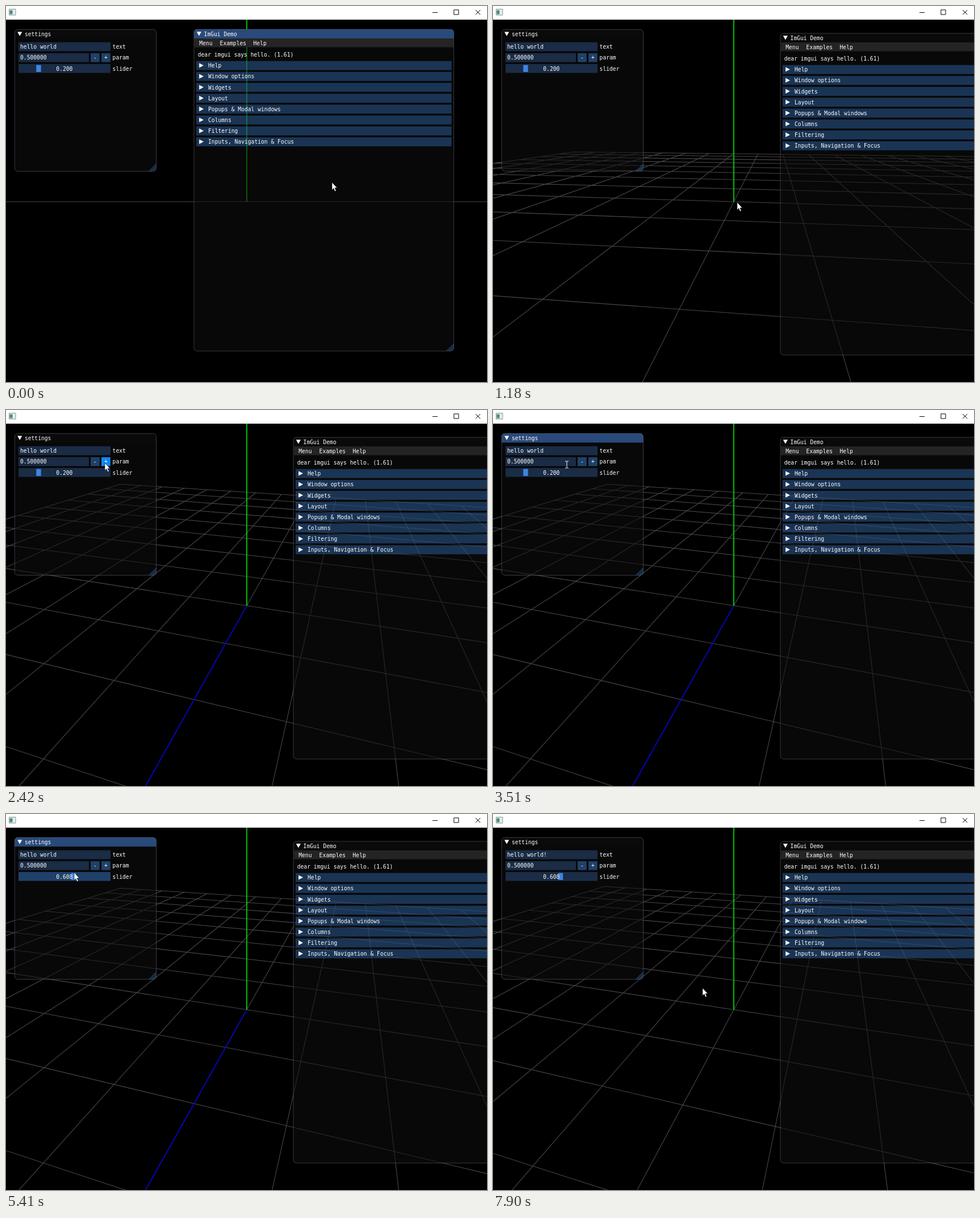
Write an HTML page that moves like this. It is 847 px wide and 661 px high and loops after 8000 ms.

```html
<!DOCTYPE html>
<html lang="en">
<head>
<meta charset="utf-8">
<title>Settings demo</title>
<style>
  html, body { margin: 0; width: 100%; height: 100%; overflow: hidden; background: #000; }
  svg { display: block; width: 847px; height: 661px; }
  text { font: 9.67px "DejaVu Sans Mono", monospace; fill: #fff; white-space: pre; }
</style>
</head>
<body>
<svg id="stage" viewBox="0 0 847 661"></svg>
<script>
const LOOP = 8000;
const CX = 424, CY = 344, FOCAL = 553, DIST = 5, HALF = 8, NEAR = 0.05;
const COL = {
  frame: 'rgba(41,74,122,.54)', hover: 'rgba(66,150,250,.4)', active: 'rgba(66,150,250,.67)',
  header: 'rgba(66,150,250,.31)', blue: '#4296fa', press: '#0f87fa',
  title: '#0a0a0a', titleOn: '#294a7a', grid: '#484848'
};

// The picture only changes on these beats: first, last, count.
const BEATS = [
  [280, 1310, 9], [1430, 1430, 1], [1700, 2660, 8], [2780, 3750, 8], [3910, 4590, 6],
  [4870, 5830, 8], [6380, 6530, 2], [7180, 7900, 6]
];

// Tracks: time followed by values, linear in between.
const CURSOR = [
  [0, 574, 310], [280, 545, 316], [409, 514, 320], [538, 556, 321], [667, 618, 323],
  [795, 674, 325], [924, 689, 327], [1053, 570, 318], [1181, 430, 345], [1310, 385, 409],
  [1430, 379, 410], [1600, 379, 410], [2380, 174, 93], [2780, 174, 93], [3057, 156, 92],
  [3334, 156, 92], [3473, 130, 96], [3750, 59, 103], [3910, 62, 107], [4590, 129, 110],
  [4870, 126, 110], [5144, 119, 109], [5281, 120, 103], [5420, 122, 92], [5830, 130.5, 68.5],
  [6380, 136, 71], [6530, 142.5, 74.5], [7180, 142.5, 74.5], [7324, 235, 165],
  [7468, 366, 290], [7900, 369, 306]
];
const DEMO = [
  [0, 331, 41], [409, 331, 41], [538, 373, 42], [667, 435, 44], [795, 491, 46], [924, 506, 48]
];
const CAMERA = [
  [1053, 0, 0], [1181, 7, 14], [1310, 14.29, 29.1], [1430, 16.4, 31.57],
  [7468, 16.4, 31.57], [7900, 15.88, 32.03]
];
const SLIDER = [[3750, .2], [3910, .23], [4590, .674], [4870, .654], [5144, .608]];

const HEADERS = ['Help', 'Window options', 'Widgets', 'Layout', 'Popups & Modal windows',
  'Columns', 'Filtering', 'Inputs, Navigation & Focus'];

function snap(t) {
  let last = 0;
  for (const [a, b, n] of BEATS) {
    if (t + 6 < a) break;
    const gap = n > 1 ? (b - a) / (n - 1) : 1;
    last = a + gap * Math.min(n - 1, Math.floor((t + 6 - a) / gap));
  }
  return last;
}

function at(track, t) {
  if (t <= track[0][0]) return track[0].slice(1);
  for (let i = 1; i < track.length; i++) {
    const a = track[i - 1], b = track[i];
    if (t <= b[0]) {
      const k = (t - a[0]) / (b[0] - a[0]);
      return a.slice(1).map((v, j) => v + (b[j + 1] - v) * k);
    }
  }
  return track[track.length - 1].slice(1);
}

const during = (t, a, b) => t >= a && t < b;
const inside = (x, y, l, top, r, b) => x >= l && x <= r && y >= top && y <= b;
const esc = s => s.replace(/&/g, '&amp;');
const rect = (x, y, w, h, fill) => `<rect x="${x}" y="${y}" width="${w}" height="${h}" fill="${fill}"/>`;
const path = (d, fill, extra = '') => `<path d="${d}" fill="${fill}" ${extra}/>`;
// y is the middle of the row
const label = (x, y, s) => `<text x="${x}" y="${y + 3.5}">${esc(s)}</text>`;

function sceneLine(cam, x1, z1, x2, z2) {
  const [ca, sa, cp, sp] = cam;
  const view = (x, z) => {
    const g = -x * sa - z * ca;
    return [x * ca - z * sa, g * sp, DIST + g * cp];
  };
  let a = view(x1, z1), b = view(x2, z2);
  if (a[2] < NEAR && b[2] < NEAR) return '';
  const clip = (p, q) => {
    if (p[2] >= NEAR) return p;
    const k = (NEAR - p[2]) / (q[2] - p[2]);
    return p.map((v, i) => v + (q[i] - v) * k);
  };
  [a, b] = [clip(a, b), clip(b, a)];
  const pt = p => (CX + FOCAL * p[0] / p[2]).toFixed(2) + ' ' + (CY - FOCAL * p[1] / p[2]).toFixed(2);
  return `M${pt(a)}L${pt(b)}`;
}

function scene(t) {
  const [yaw, pitch] = at(CAMERA, t).map(v => v * Math.PI / 180);
  const cam = [Math.cos(yaw), Math.sin(yaw), Math.cos(pitch), Math.sin(pitch)];
  let d = '';
  for (let i = -HALF; i <= HALF; i++) {
    d += sceneLine(cam, i, -HALF, i, HALF) + sceneLine(cam, -HALF, i, HALF, i);
  }
  let out = path(d, 'none', `stroke="${COL.grid}" stroke-width="1.1"`);
  if (during(t, 1430, 7468)) {
    out += path(sceneLine(cam, 0, 0, 0, HALF), 'none', 'stroke="#0000e0" stroke-width="1.5"');
  }
  return out + path(`M${CX} ${CY}V20`, 'none', 'stroke="#00dc00" stroke-width="1.7"');
}

function panel(w, h, title, focused) {
  const r = 5.8;
  return `<rect width="${w}" height="${h}" rx="${r}" fill="rgba(15,15,15,.55)"/>` +
    path(`M0 16V${r}Q0 0 ${r} 0H${w - r}Q${w} 0 ${w} ${r}V16Z`, focused ? COL.titleOn : COL.title) +
    path(`M${w} ${h - 14}V${h - r}Q${w} ${h} ${w - r} ${h}H${w - 14}Z`, 'rgba(66,150,250,.25)') +
    `<rect width="${w}" height="${h}" rx="${r}" fill="none" stroke="rgba(110,110,128,.5)"/>` +
    path('M4.8 4.2H13L8.9 11.4Z', '#fff') + label(17.6, 8.2, title);
}

function demoWindow(t) {
  const [x, y] = at(DEMO, t).map(Math.round);
  let out = panel(457.5, 565.6, 'ImGui Demo', t < 1180) + rect(.5, 16, 456.5, 15.5, '#242424') +
    label(9.2, 24.3, 'Menu') + label(45.6, 24.3, 'Examples') + label(104.5, 24.3, 'Help') +
    label(6.7, 44.3, 'dear imgui says hello. (1.61)');
  HEADERS.forEach((s, i) => {
    const top = 55.8 + i * 19.15;
    out += rect(4, top, 449.6, 15.8, COL.header) +
      path(`M9.2 ${top + 3.6}V${top + 11.8}L17 ${top + 7.7}Z`, '#fff') + label(25, top + 8, s);
  });
  return `<g transform="translate(${x} ${y})">${out}</g>`;
}

function button(x, sign, pressed, mx, my) {
  const fill = pressed ? COL.press : inside(mx, my, x, 83, x + 16, 98.5) ? COL.blue : COL.hover;
  return rect(x, 83, 15.8, 15.6, fill) + label(x + 5, 90.9, sign);
}

function settingsWindow(t, mx, my) {
  const [value] = at(SLIDER, t);
  const dragging = during(t, 3900, 5140);
  const over = inside(mx, my, 22, 102, 184, 117.5);
  const text = t >= 7175 ? 'hello world!' : 'hello world';
  const param = during(t, 2515, 3190) ? '0.600000' : '0.500000';

  let out = `<g transform="translate(15.3 41.3)">${panel(249.2, 249.2, 'settings', during(t, 2515, 7460))}</g>`;
  out += rect(22, 63.7, 162, 15.7, COL.frame);
  if (during(t, 6375, 6525)) out += rect(25, 65.5, 64, 12, 'rgba(66,150,250,.35)');
  out += label(25, 71.5, text) + label(187.6, 71.5, 'text');
  if (during(t, 6525, 7460)) out += rect(25 + text.length * 5.82, 66.5, 1, 10, '#fff');

  out += rect(22, 83, 124, 15.6, COL.frame) + label(25, 90.8, param) +
    button(149, '-', during(t, 3190, 3330), mx, my) +
    button(168, '+', during(t, 2380, 2515), mx, my) + label(187.6, 90.8, 'param');

  out += rect(22, 102, 162, 15.6, dragging ? COL.active : over ? COL.hover : COL.frame) +
    rect(27.3 + 150.8 * value - 4.2, 103.7, 8.4, 12.3, dragging ? COL.blue : '#3d85e0') +
    label(88.3, 110, value.toFixed(3)) + label(187.6, 110, 'slider');
  return out;
}

function pointer(x, y) {
  const typing = inside(x, y, 22, 63.7, 184, 79.4) || inside(x, y, 22, 83, 146, 98.6);
  const shape = typing
    ? path('M-3 -6H-.8L0 -5.2L.8 -6H3M0 -5.2V5.2M-3 6H-.8L0 5.2L.8 6H3', 'none', 'stroke="#fff"')
    : path('M0 0V13.4L3 10.6L5 15.8L7.3 14.8L5.1 9.8H9.2Z', '#fff', 'stroke="#000" stroke-width=".6"');
  return `<g transform="translate(${x} ${y})">${shape}</g>`;
}

const TITLE_BAR = rect(0, 0, 847, 24, '#fff') +
  rect(5.5, 5.5, 11.5, 10.5, '#e9ecec') + rect(6.5, 7.5, 5, 7, '#3f8f7c') +
  path('M5.5 5.5H17V16H5.5Z', 'none', 'stroke="#8a9499"') +
  path('M751 11.5H760M788.8 6.8H797V15H788.8ZM827 7L835.2 15.2M835.2 7L827 15.2', 'none', 'stroke="#000"');

const stage = document.getElementById('stage');
let shown = -1;

function draw(time) {
  const t = snap(time);
  if (t === shown) return;
  shown = t;
  const [mx, my] = at(CURSOR, t);
  stage.innerHTML = rect(0, 0, 847, 661, '#000') + scene(t) + settingsWindow(t, mx, my) +
    demoWindow(t) + TITLE_BAR + pointer(mx, my);
}

const start = performance.now();
function tick() {
  draw((performance.now() - start) % LOOP);
  requestAnimationFrame(tick);
}
tick();
</script>
</body>
</html>
```
